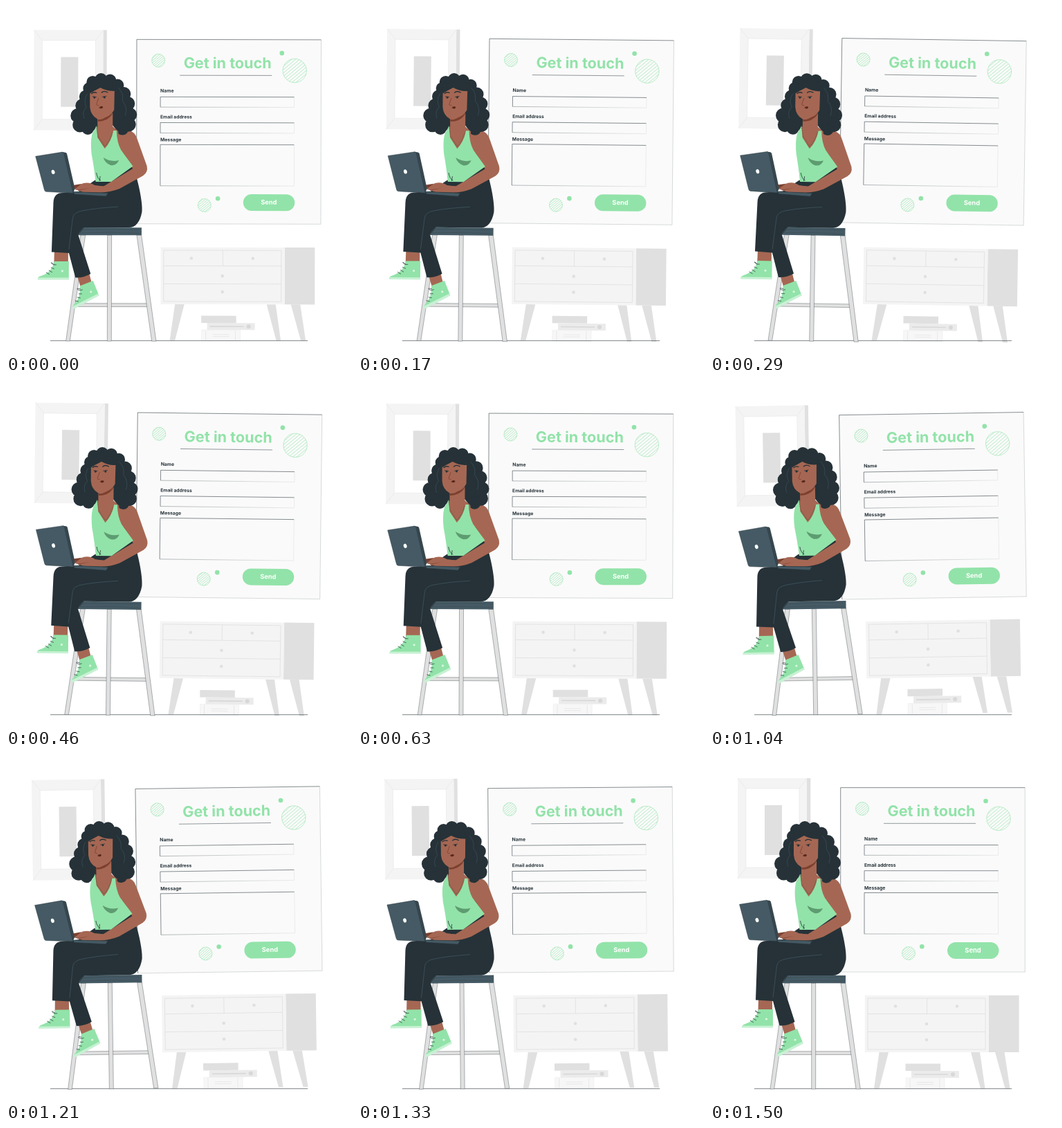
An HTML page with a canvas for the animation above (1.54 s loop, 500x500 px).

```html
<!DOCTYPE html>
<html lang="en">
<head>
<meta charset="utf-8">
<title>Get in touch</title>
<style>
  html, body { margin: 0; width: 100%; height: 100%; overflow: hidden; background: #fff; }
  canvas { display: block; width: 500px; height: 500px; }
</style>
</head>
<body>
<canvas id="stage"></canvas>
<script>
const LOOP = 1540, STEPS = 37;
const GREEN = '#92e3a9', DARK = '#263238', SLATE = '#455a64';
const SKIN = '#a56753', SHADE = '#7d402f';
const PALE = '#f4f4f4', GREY = '#e0e0e0';

const canvas = document.getElementById('stage');
const ctx = canvas.getContext('2d');
const dpr = window.devicePixelRatio || 1;
canvas.width = canvas.height = 500 * dpr;

function shape(d, fill, stroke, width = 0.6) {
  const path = new Path2D(d);
  if (fill) { ctx.fillStyle = fill; ctx.fill(path); }
  if (stroke) { ctx.strokeStyle = stroke; ctx.lineWidth = width; ctx.stroke(path); }
}

function box(x1, y1, x2, y2, fill, stroke, width) {
  shape(`M${x1} ${y1}H${x2}V${y2}H${x1}Z`, fill, stroke, width);
}

function dot(x, y, r, fill) {
  ctx.beginPath();
  ctx.arc(x, y, r, 0, Math.PI * 2);
  ctx.fillStyle = fill;
  ctx.fill();
}

function label(text, x, y, size, fill, align = 'left') {
  ctx.font = `700 ${size}px Inter, sans-serif`;
  ctx.textAlign = align;
  ctx.fillStyle = fill;
  ctx.fillText(text, x, y);
}

function swayed(cx, cy, angle, draw) {
  ctx.save();
  ctx.translate(cx, cy);
  ctx.rotate(angle);
  ctx.translate(-cx, -cy);
  draw();
  ctx.restore();
}

function stripedBall(x, y, r, gap) {
  ctx.save();
  ctx.beginPath();
  ctx.arc(x, y, r, 0, Math.PI * 2);
  ctx.strokeStyle = GREEN;
  ctx.lineWidth = 0.6;
  ctx.stroke();
  ctx.clip();
  ctx.translate(x, y);
  ctx.rotate(-0.7);
  ctx.beginPath();
  for (let i = -r + gap / 2; i < r; i += gap) {
    ctx.moveTo(-r, i);
    ctx.lineTo(r, i);
  }
  ctx.stroke();
  ctx.restore();
}

function room() {
  // picture frame
  box(140, 35, 145.3, 180, GREY);
  box(40, 35, 140, 180, PALE);
  shape('M40 35L52 50M140 35L129 50M40 180L52 164M140 180L129 164', null, GREY, 0.5);
  box(52, 50, 129, 164, '#fff', '#e6e6e6', 0.6);
  box(79, 74, 104, 146, GREY);

  // sideboard
  shape('M244.5 431H258L244.5 483.5H237Z', GREY);
  shape('M377 431H390L397.5 483.5H391Z', GREY);
  shape('M412 431H425.5L433.5 483.5H426.5Z', GREY);
  box(403, 348.7, 446.5, 431, GREY);
  box(223.7, 348.7, 403, 431, PALE);
  shape('M228 353H398V427H228ZM228 375.5H398M228 401.5H398M313.5 353V375.5', null, '#dcdcdc', 0.7);
  for (const [x, y] of [[268, 364.5], [357, 364.5], [313, 390], [313, 413]]) dot(x, y, 2.3, GREY);

  // books
  box(282.5, 447.5, 333, 458, GREY);
  box(291, 458, 360, 468, '#ebebeb');
  shape('M295 463H344', null, '#d8d8d8', 1.6);
  dot(351, 463, 3, '#d8d8d8');
  box(283, 468, 339, 483.5, '#f7f7f7', '#ececec', 0.6);
  shape('M289 469V483M332 469V483M299 474.5H323M299 477.5H323', null, '#e3e3e3', 0.7);
}

function field(y1, y2) {
  const fade = ctx.createLinearGradient(223, 0, 416, 0);
  fade.addColorStop(0, 'rgba(38,50,56,.7)');
  fade.addColorStop(1, 'rgba(38,50,56,.15)');
  shape(`M223 ${y2}V${y1}H416.5`, null, DARK, 0.55);
  shape(`M223 ${y2}H416.5V${y1}`, null, fade, 0.5);
}

function form() {
  box(188.7, 48.6, 455.2, 315, '#fafafa');
  shape('M188.7 315V48.6H455.2', null, DARK, 0.55);
  shape('M188.7 315H455.2V48.6', null, 'rgba(38,50,56,.35)', 0.5);

  stripedBall(220, 79, 9.5, 2.6);
  stripedBall(417, 93.3, 17.2, 3.7);
  stripedBall(287, 288, 9.5, 2.6);
  dot(398.5, 68, 3.3, GREEN);
  dot(306.3, 278.3, 3.3, GREEN);

  label('Get in touch', 320, 90, 21.6, GREEN, 'center');
  shape('M251 100.3H384', null, DARK, 0.5);
  label('Name', 223, 125, 6.8, DARK);
  label('Email address', 223, 162.6, 6.7, DARK);
  label('Message', 223, 195.6, 6.8, DARK);
  field(131.5, 146.3);
  field(168.7, 183.7);
  field(200.5, 260);

  ctx.beginPath();
  ctx.roundRect(343, 272, 74.4, 24, 12);
  ctx.fillStyle = GREEN;
  ctx.fill();
  label('Send', 380, 286.7, 9.3, '#fff', 'center');
}

function stool() {
  const line = 'rgba(38,50,56,.7)';
  box(99, 429.7, 208, 434.5, GREY, line, 0.5);
  shape('M146.7 331H152.7V484H146.7Z', GREY, line, 0.5);
  shape('M108 331H114.8L92.7 484H87Z', GREY, line, 0.5);
  shape('M189 331H195.8L217.3 484H211Z', GREY, line, 0.5);
  box(104, 320, 196, 331.2, SLATE);
  shape('M108 323.5Q150 321 193 323M106 328Q150 326 194 328.5', null, '#3b4e57', 0.6);
}

function shoe(d, sole, laces) {
  shape(d, GREEN);
  shape(sole, '#c8f1d4');
  shape(laces, null, DARK, 0.7);
}

function legs() {
  shape('M70 354H90V372H69.5Z', SKIN);
  shape('M103 390L120 385L124 400L108 406Z', SKIN);
  shoe('M70 369H91V395H46Q46 392 50 390.5C60 387 67 382 70 369Z',
    'M46 395.8Q45.6 394 47 392.7H91V395.8Z',
    'M70 374Q64 369 66 372Q68 375 73 374M65 378L70 380M62 382L67 385M58 385L63 388');
  shoe('M107 404.5L126 397L134.5 418L98 437.5Q95.5 435 98 432C105 424 108 417 107 404.5Z',
    'M98 438Q95.7 436.5 96.5 434.2L133.5 415.5L134.7 418.4Z',
    'M108 409Q101 407 104 410Q107 412 111 410M105 416L110 416M103 421L108 422M100 426L105 427');
  dot(81.5, 383, 1.6, '#d9f6e1');
  dot(123, 413, 1.6, '#d9f6e1');

  shape('M128 252L183 231C190 248 198 284 196.5 297C194 312 187 320 178 320H113L104.5 331L122.5 387Q112 393 100.5 392.5L91 357L66 355.5L68.5 284Q69 270 82 270L105 268Z', DARK);
  shape('M162 290Q130 292 110 296Q98 298 96.5 306L91 352M104.5 331Q107 324 113 320', null, SLATE, 0.7);
}

const CURLS = [
  [137, 106, 9], [125, 110, 9], [150, 107.5, 9], [161, 114.5, 9], [119.5, 119, 8.5],
  [115, 131, 9.5], [110, 144, 10], [103.5, 158.5, 10.5], [106.5, 172, 10.5], [118, 177, 9],
  [170, 127, 10], [176, 141, 10], [179, 157, 10], [177, 171, 10.5], [168, 177.5, 9]
];

function hair() {
  shape('M120 112L160 110L178 145L176 176L160 180L148 165L126 180L106 168L114 130Z', DARK);
  for (const [x, y, r] of CURLS) dot(x, y, r, DARK);
  shape('M162 118Q170 126 168 137Q176 146 172 158M117 127Q111 137 116 146Q109 153 113 163', null, SLATE, 0.5);
}

function face() {
  shape('M121 125Q130 122 136 117Q146 122 156.5 122.5L156 150Q152 158 144 160.5Q137 165.5 132 163.5Q122 158 121 146Z', SKIN);
  shape('M121 126.5Q129 121 136 118Q147 124 158 122.5L160 112L138 104L121 113Z', DARK);
  shape('M123 127Q126 123.5 131 125.5M137.5 125.5Q141 121.5 147 125', null, DARK, 1.3);
  shape('M124.5 130.8L130.5 131.6M138.5 131.4L145 130.2', null, DARK, 0.8);
  dot(127.5, 132.3, 1.5, DARK);
  dot(142, 132, 1.5, DARK);
  shape('M133.5 133L130.3 142.5Q131.5 144 134 143.6', null, SHADE, 0.8);
  shape('M134 147Q138 143 140 146.3Q138.5 150 134 147Z', '#59291f');
}

function torso() {
  // reaching arm
  shape('M154 177L178 180Q186 182 189 191L203.5 231Q205.5 240 198 245L164 264Q150 269.5 137 269.5L112 269L98 264.5L126 259L141 260.5L183 235L164 206Z', SKIN);
  shape('M182 231L169 212', null, SHADE, 0.7);
  hair();
  shape('M132 158V174L125 184L126 202L142 212L162 200L162 181L154 174V155Z', SKIN);
  shape('M132.5 162Q144 164 153 154V157Q146 167 132.5 167Z', SHADE);
  face();

  // top
  shape('M130.5 173L132 190L142.5 206Q152 196 155 180H159.5Q160 197 166 208L183.3 231.5L152 254H129.5Q127 232 123.5 214Q121.5 197 124 186Z', GREEN);
  ctx.setLineDash([1.6, 1.2]);
  shape('M131 176L133 188.5L142.5 203Q150 195 153.5 182', null, '#6f5b43', 1.1);
  ctx.setLineDash([]);
  shape('M140.5 219Q151 226 163 223Q159 231.5 151 230Q143 227 140.5 219Z', '#5d9c70');
  shape('M130.5 241Q132 250 137 252M136 246L135 253', null, DARK, 0.8);

  // hand on the keys
  shape('M98 264L99 261L112 256Q121 254 129 259.5L141 260.5L138 269L112 269Z', SKIN);
  shape('M97 259L109 257L100 264ZM104 266L121 263L104 267Z', SHADE);
}

function laptop() {
  shape('M97 268.5L147.5 270.3L144.5 275L99 272Z', SLATE, DARK, 0.5);
  shape('M81 211.2L86 211.8Q87.6 212 88 214L99.5 264L97 270.5L92 270Z', '#37474f');
  shape('M42.5 217.3L81 211.2Q83 211 83.5 213L97 270.5L58 268.5Q56 268.3 55.4 266Z', SLATE, DARK, 0.4);
  ctx.beginPath();
  ctx.ellipse(68, 240, 2.4, 3.2, -0.25, 0, Math.PI * 2);
  ctx.fillStyle = '#fff';
  ctx.fill();
}

function sitter() {
  stool();
  legs();
  torso();
  laptop();
}

// Triangle wave of one degree at 24 steps a second, resting one extra step at its low end.
function swayAngle(time) {
  const step = Math.floor((time % LOOP + 5) / (LOOP / STEPS)) % STEPS;
  const beat = step < 27 ? step + 1 : step;
  const degrees = beat <= 9 ? beat / 9 : beat <= 27 ? (18 - beat) / 9 : (beat - 36) / 9;
  return degrees * Math.PI / 180;
}

const start = performance.now();

function frame() {
  const angle = swayAngle(performance.now() - start);
  ctx.setTransform(dpr, 0, 0, dpr, 0, 0);
  ctx.fillStyle = '#fff';
  ctx.fillRect(0, 0, 500, 500);
  swayed(243, 260, angle, room);
  shape('M64 483.7H436', null, DARK, 0.6);
  swayed(322, 182, angle, form);
  swayed(130, 290, angle, sitter);
  requestAnimationFrame(frame);
}
frame();
</script>
</body>
</html>
```
